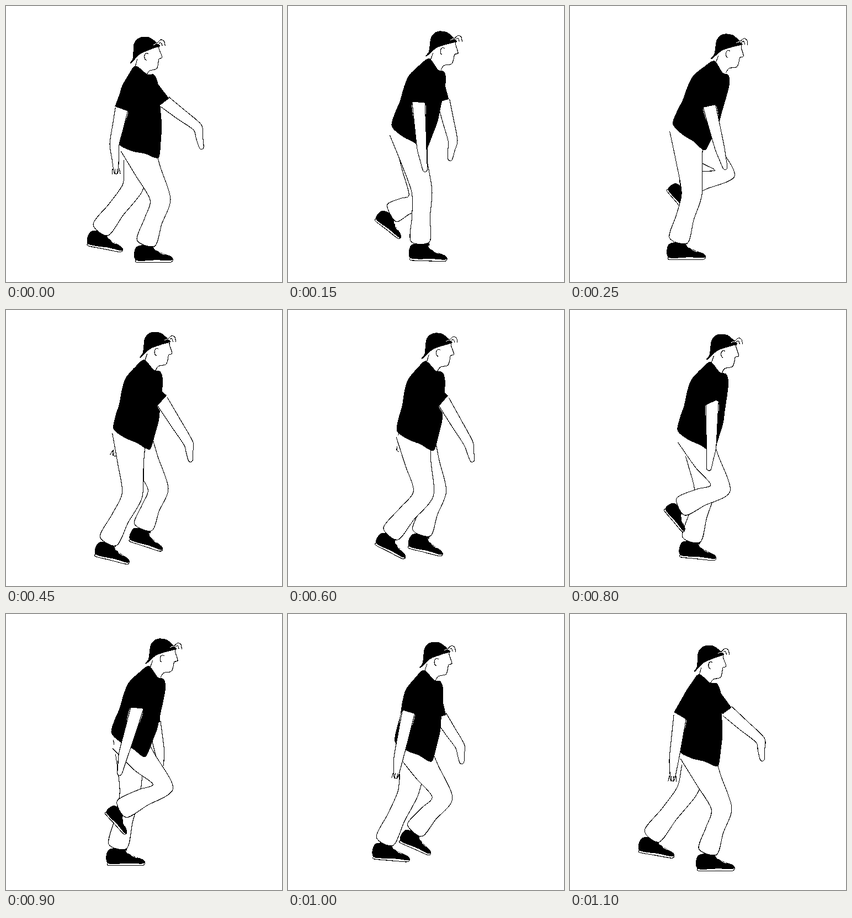
An HTML page with a canvas that plays this animation: 500 px wide and 500 px high, repeating every 1150 ms.

```html
<!DOCTYPE html>
<html lang="en">
<head>
<meta charset="utf-8">
<title>Walking man</title>
<style>
html, body { margin: 0; width: 100%; height: 100%; overflow: hidden; background: #fff; }
canvas { display: block; width: 100%; height: 100%; image-rendering: pixelated; }
</style>
</head>
<body>
<canvas id="stage" width="500" height="500"></canvas>
<script>
const SIZE = 500, STEP = 50, COUNT = 23, INK = '#000', PAPER = '#fff';
const ctx = document.getElementById('stage').getContext('2d', { willReadFrequently: true });

// Joints at key steps of the walk; steps between are blended.
// neck, hip
const spine = {
  0: [247,114, 238,262], 3: [266,104, 216,238], 5: [271,109, 213,236], 9: [261,98, 225,233],
  14: [261,101, 230,238], 18: [269,103, 219,236], 22: [246,115, 230,261]
};
// knee, ankle, shoe angle
const nearLeg = {
  0: [279,350, 253,429, 0], 3: [242,335, 239,426, 2], 5: [220,340, 196,424, 0],
  9: [228,335, 185,418, 14], 14: [256,330, 186,396, 36], 16: [272,322, 200,356, 50],
  18: [284,312, 209,353, 48], 22: [274,352, 249,430, 0]
};
const farLeg = {
  0: [228,330, 171,405, 11], 3: [235,350, 187,375, 38], 5: [280,302, 205,328, 50],
  9: [275,323, 248,393, 18], 14: [263,330, 237,410, 12], 18: [224,325, 202,420, 0],
  22: [210,322, 148,402, 10]
};
// sleeve end, wrist, fingertips
const nearArm = {
  0: [209,186, 196,250, 199,301], 3: [236,174, 242,258, 248,298], 5: [252,181, 271,258, 281,294],
  9: [282,164, 330,241, 334,273], 11: [283,165, 340,240, 352,266], 14: [277,163, 299,243, 297,287],
  18: [237,170, 212,255, 205,290], 22: [199,184, 188,263, 185,300]
};
const farArm = {
  0: [287,173, 346,219, 354,257], 3: [281,171, 298,243, 293,278], 5: [256,165, 244,205, 232,225],
  9: [232,165, 208,235, 196,262], 11: [222,165, 196,245, 187,272], 14: [235,165, 230,200, 226,220],
  18: [268,195, 278,250, 281,275], 22: [284,175, 344,228, 348,264]
};

// Outlines around an anchor, as x, y
const pairs = a => a.flatMap((v, i) => i % 2 ? [] : [[v, a[i + 1]]]);
const shirt = pairs([-13,-5, 9,8, 21,8, 30,25, 38,75, 41,95, 41,118, 40,148, 32,151, 13,145,
  -10,142, -34,132, -37,108, -36,85, -38,60, -37,36, -25,11]);
const cap = pairs([-24,-10, -18,-20, -10,-24, 3,-24, 12,-19, 22,-11, 23,-8, 7,-2, -12,7, -27,23, -30,23, -25,14]);
const faceLines = [
  [22,-9, 22,-3, 28,12, 22,15, 21,24, 18,33, 5,37, 0,46],
  [3,6, -1,5, -4,9, -3,16, 0,18],
  [-17,16, -21,32],
  [18,-13, 25,-20, 31,-17, 33,-9],
  [20,-11, 25,-15, 28,-9]
].map(pairs);
const upper = pairs([-17,3, 14,-2, 16,7, 22,11, 34,16, 45,20, 49,25, 44,28, 20,27, -18,27]);
const sole = pairs([-18,26, -17,31, 12,31, 44,31, 49,27, 48,23]);
const lace = pairs([14,3, 18,9, 22,9, 26,14, 34,17]);

const legWidth = t => 31 - 36 * t + 22 * t * t;
const armWidth = t => 11.5 - 8 * t + Math.sin(Math.PI * t);
const blend = (a, b, u) => a.map((v, i) => v + (b[i] - v) * u);
const unit = (a, b) => {
  const d = Math.hypot(b[0] - a[0], b[1] - a[1]) || 1;
  return [(b[0] - a[0]) / d, (b[1] - a[1]) / d];
};

function pose(track, step) {
  const keys = Object.keys(track).map(Number);
  const a = keys.filter(k => k <= step).pop();
  const b = keys.find(k => k >= step);
  return blend(track[a], track[b], a === b ? 0 : (step - a) / (b - a));
}

// Moves shape points to o; [dx, dy] is where the shape's x axis points
function place(shape, o, [dx, dy], sx = 1, sy = sx) {
  return shape.map(([x, y]) => [o[0] + x * sx * dx - y * sy * dy, o[1] + x * sx * dy + y * sy * dx]);
}

const turn = deg => [Math.cos(deg * Math.PI / 180), Math.sin(deg * Math.PI / 180)];

// Outline of a bent limb: down its back edge, up its front edge
function tube(root, joint, end, width) {
  const mid = [root, blend(root, joint, .5), joint, blend(joint, end, .5), end];
  const side = sign => mid.map((p, i) => {
    const before = unit(mid[Math.max(0, i - 1)], mid[Math.max(1, i)]);
    const after = unit(mid[Math.min(3, i)], mid[Math.min(4, i + 1)]);
    const [tx, ty] = unit([0, 0], [before[0] + after[0], before[1] + after[1]]);
    const w = width(i / 4) * sign;
    return [p[0] + ty * w, p[1] - tx * w];
  });
  return [...side(-1), ...side(1).reverse()];
}

// Soft curve through all points
function trace(pts, closed) {
  const n = pts.length, k = 1 / 7;
  const at = i => pts[closed ? (i + n) % n : Math.max(0, Math.min(n - 1, i))];
  ctx.beginPath();
  ctx.moveTo(...at(0));
  for (let i = 0; i < (closed ? n : n - 1); i++) {
    const [p, a, b, q] = [at(i - 1), at(i), at(i + 1), at(i + 2)];
    ctx.bezierCurveTo(a[0] + (b[0] - p[0]) * k, a[1] + (b[1] - p[1]) * k,
      b[0] - (q[0] - a[0]) * k, b[1] - (q[1] - a[1]) * k, ...b);
  }
}

function line(pts, color = INK, width = 1.1) {
  trace(pts);
  ctx.lineWidth = width;
  ctx.strokeStyle = color;
  ctx.stroke();
}

function fill(pts, color = INK) {
  trace(pts, true);
  ctx.fillStyle = color;
  ctx.fill();
}

function outline(pts) {
  fill(pts, PAPER);
  line(pts);
}

function drawLeg(hip, [kx, ky, ax, ay, deg]) {
  const knee = [kx, ky], ankle = [ax, ay];
  const shank = unit(knee, ankle), dir = turn(deg), scale = 1 - deg / 230;
  const heel = [ax + shank[0] * 4 + 1, ay + shank[1] * 4];
  outline(place(sole, heel, dir, scale));
  fill(place(upper, heel, dir, scale));
  line(place(lace, heel, dir, scale), PAPER);
  outline(tube(hip, knee, ankle, legWidth));
}

function drawArm(shoulder, [sx, sy, wx, wy, tx, ty], hip, sleeve) {
  const cuff = [sx, sy], wrist = [wx, wy], tip = [tx, ty];
  outline(tube(cuff, wrist, tip, armWidth));
  line([shoulder, cuff], INK, sleeve);
  // fingers show when the hand trails behind the body
  if (tx < hip[0] - 28) {
    for (let i = -1.5; i < 2; i++) {
      line(place([[-7, i * 4], [3, i * 5]], tip, unit(wrist, tip)));
    }
  }
}

function drawHead(at, dir) {
  faceLines.forEach(p => line(place(p, at, dir)));
  fill(place(cap, at, dir));
  line(place([[12, -10], [17, -13], [23, -12]], at, dir), PAPER);
}

// Hard black and white edges
function harden() {
  const img = ctx.getImageData(0, 0, SIZE, SIZE), d = img.data;
  for (let i = 0; i < d.length; i += 4) d[i] = d[i + 1] = d[i + 2] = d[i] < 128 ? 0 : 255;
  ctx.putImageData(img, 0, 0);
}

function draw(step) {
  ctx.setTransform(1, 0, 0, 1, 0, 0);
  ctx.fillStyle = PAPER;
  ctx.fillRect(0, 0, SIZE, SIZE);
  ctx.translate(.5, .5);

  const [nx, ny, hx, hy] = pose(spine, step);
  const neck = [nx, ny], hip = [hx, hy], lean = nx - hx;
  const down = unit(neck, hip), across = [down[1], -down[0]];
  const tall = Math.hypot(lean, hy - ny) / 141;
  const [nearShoulder, farShoulder] = place([[-20, 30], [10, 18]], neck, across);

  drawArm(farShoulder, pose(farArm, step), hip, 20);
  drawLeg([hx + 6, hy - 8], pose(farLeg, step));
  drawLeg([hx - 2, hy - 12], pose(nearLeg, step));
  drawHead([nx + 6 + lean * .18, ny - 34], turn(lean * .12));
  fill(place(shirt, neck, across, 1, tall));
  drawArm(nearShoulder, pose(nearArm, step), hip, 26);
  harden();
}

let shown = -1;
function tick() {
  const step = Math.floor(performance.now() / STEP) % COUNT;
  if (step !== shown) draw(shown = step);
  requestAnimationFrame(tick);
}
tick();
</script>
</body>
</html>
```
